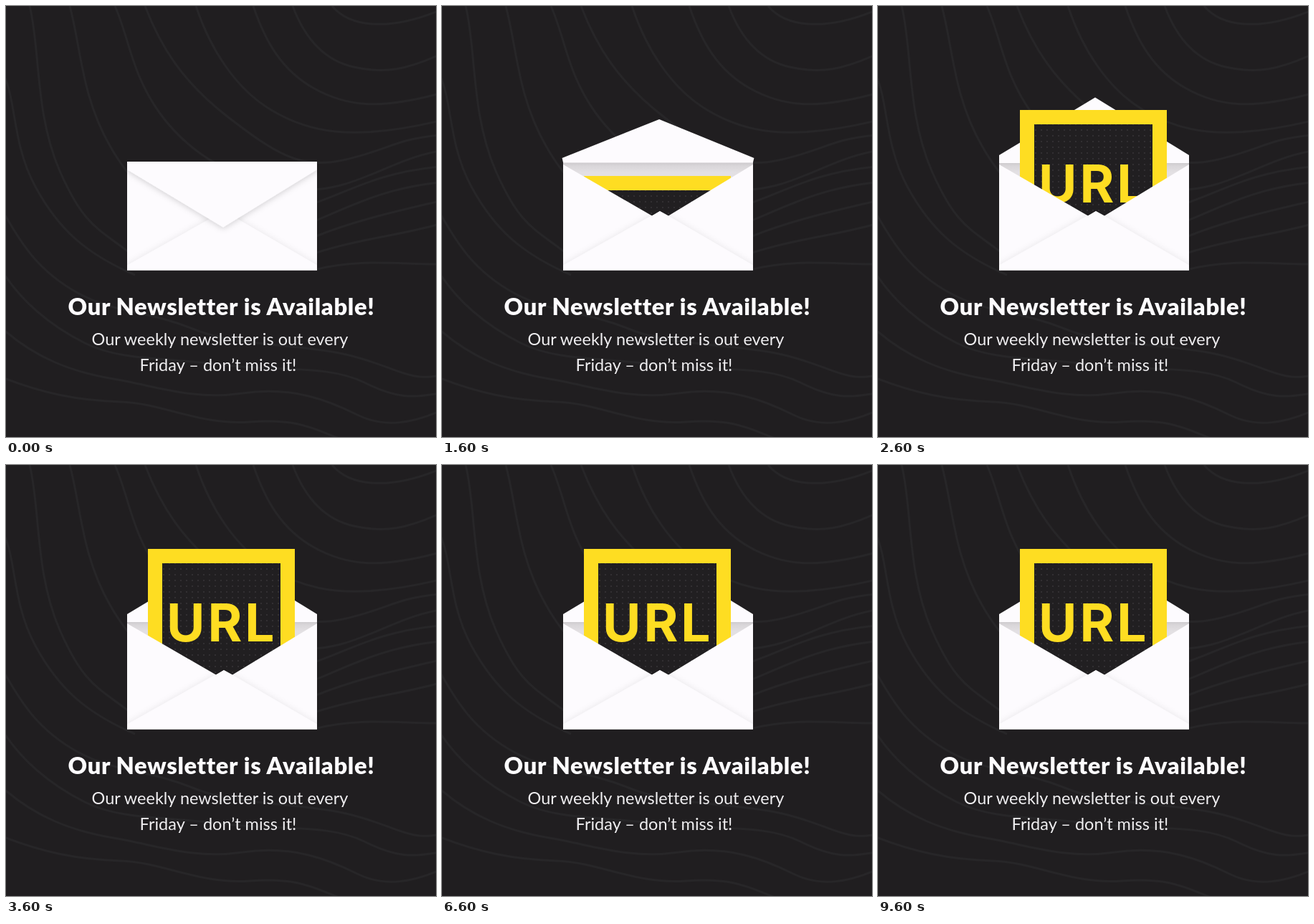
Write an HTML page that moves like this. It is 600 px wide and 601 px high and loops after 9.7 s.

```html
<!DOCTYPE html>
<html lang="en">
<head>
<meta charset="utf-8">
<title>Newsletter</title>
<style>
html, body { margin: 0; width: 100%; height: 100%; overflow: hidden; background: #201e20; }
svg { display: block; width: 600px; height: 601px; }
.lines { fill: none; stroke: #272628; stroke-width: 3; }
.paper { fill: #fdfbfe; }
.copy { font-family: Lato, "Open Sans", sans-serif; text-anchor: middle; fill: #efeef0; font-weight: 400; font-size: 24px; font-variant-ligatures: none; }
.title { font-weight: 900; font-size: 31px; letter-spacing: .02em; fill: #fdfcfe; }
.word { font: 700 73px Inter, "Open Sans", sans-serif; letter-spacing: 4px; fill: #fedd22; }
</style>
</head>
<body>
<svg viewBox="0 0 600 601">
  <defs>
    <linearGradient id="lining" x1="0" y1="0" x2="0" y2="1">
      <stop offset="0" stop-color="#c9c6c9"/>
      <stop offset=".04" stop-color="#d9d6d9"/>
      <stop offset=".1" stop-color="#e3e0e3"/>
      <stop offset="1" stop-color="#e8e5e8"/>
    </linearGradient>
    <pattern id="dots" width="8" height="8" patternUnits="userSpaceOnUse">
      <circle cx="4" cy="4" r=".9" fill="#39373a"/>
    </pattern>
    <filter id="soft" x="-20%" y="-20%" width="140%" height="140%">
      <feDropShadow dx="0" dy="2" stdDeviation="4" flood-color="#000" flood-opacity=".17"/>
    </filter>
    <filter id="faint" x="-20%" y="-20%" width="140%" height="140%">
      <feDropShadow dx="0" dy="-1" stdDeviation="4" flood-color="#000" flood-opacity=".08"/>
    </filter>
    <clipPath id="inside"><rect x="169" y="0" width="265" height="345"/></clipPath>
    <clipPath id="front"><path d="M169 221L293 292.5L304 286L316 292.5L434 221V368.4H169Z"/></clipPath>
    <clipPath id="body"><rect x="166" y="217" width="272" height="151.4"/></clipPath>
  </defs>

  <g class="lines">
    <path d="M-5 92C15 130 8 190 40 250S110 345 180 375"/>
    <path d="M33 0C48 60 40 150 75 230S130 310 180 350"/>
    <path d="M89 0C105 60 105 125 145 195S210 265 260 290"/>
    <path d="M152 0C172 45 175 95 215 150S320 245 400 255S530 215 605 202"/>
    <path d="M194 0C215 55 245 105 310 155S410 228 470 215S545 185 605 180"/>
    <path d="M265 0C285 60 320 115 370 145S480 190 605 160"/>
    <path d="M345 0C362 50 385 90 430 115S520 145 605 122"/>
    <path d="M400 0C415 40 440 75 485 85S560 88 605 68"/>
    <path d="M455 0C480 30 535 35 605 6"/>
    <path d="M430 275C480 258 520 232 605 224"/>
    <path d="M430 300C490 275 530 254 605 246"/>
    <path d="M430 322C490 298 550 285 605 272"/>
    <path d="M430 345C490 325 550 320 605 304"/>
    <path d="M430 368C490 352 545 360 605 360"/>
    <path d="M-5 285C20 330 45 370 100 400S200 425 260 450S400 470 470 485S560 525 605 515"/>
    <path d="M-5 370C20 410 60 445 110 470S220 490 300 500S450 500 500 525S570 545 605 540"/>
    <path d="M-5 450C40 490 90 510 150 520S260 550 330 540S450 550 490 570S570 580 605 565"/>
    <path d="M-5 518C50 540 100 550 160 552S270 585 340 580S430 590 470 605"/>
  </g>

  <rect x="169" y="217" width="265" height="151" fill="url(#lining)"/>
  <g id="back"></g>
  <g clip-path="url(#inside)">
    <g id="card">
      <rect x="198" width="205" height="250" fill="#fedd22"/>
      <rect x="218" y="20" width="165" height="230" fill="#211f21"/>
      <rect x="218" y="20" width="165" height="230" fill="url(#dots)"/>
      <text id="word" class="word" x="224" y="129">URL</text>
    </g>
  </g>
  <g clip-path="url(#front)">
    <rect class="paper" x="169" y="217" width="265" height="152"/>
    <path class="paper" filter="url(#faint)" d="M165 364L304 286L438 364V380H165Z"/>
  </g>
  <g id="over"></g>
  <polygon id="flap" class="paper"/>

  <text class="copy title" x="300.5" y="431" data-w="428">Our Newsletter is Available!</text>
  <text class="copy" x="298.5" y="473" data-w="358">Our weekly newsletter is out every</text>
  <text class="copy" x="296" y="509" data-w="219">Friday – don’t miss it!</text>
</svg>
<script>
const $ = id => document.getElementById(id);
const [flap, back, over, card, word] = ['flap', 'back', 'over', 'card', 'word'].map($);
const LOOP = 9700, STEP = 100, HINGE = 218, DEPTH = 750;
// x and distance from the hinge
const FLAP = [[169, -1], [169, 10], [303, 90.5], [434, 10], [434, -1]];
const clamp = v => Math.min(1, Math.max(0, v));

// Choose a type size that suits each line
for (const el of document.querySelectorAll('[data-w]')) {
  const size = parseFloat(getComputedStyle(el).fontSize);
  el.style.fontSize = size * el.dataset.w / el.getComputedTextLength() + 'px';
}

function flapAngle(t) {
  const p = clamp((t - 500) / 1735);
  return Math.PI * (1 - Math.cos(Math.PI * p)) / 2;
}

function cardTop(t) {
  if (t < 1600) return 250 - 13 * clamp((t - 1300) / 300) ** 2;
  if (t < 2600) return 237 - 92 * (t - 1600) / 1000;
  return 117 + 28 * (1 - clamp((t - 2600) / 1000)) ** 3;
}

function shake(t) {
  const u = (t - 4000) % 1000;
  return t < 4000 || u >= 600 ? 0 : 15 * Math.sin(4 * Math.PI * (u + STEP) / 700);
}

function draw(t) {
  const a = flapAngle(t), open = a > Math.PI / 2;
  flap.setAttribute('points', FLAP.map(([x, d]) => {
    const s = DEPTH / (DEPTH - d * Math.sin(a));
    return [302 + (x - 302) * s, HINGE + d * Math.cos(a) * s].map(v => v.toFixed(2));
  }).join(' '));
  const layer = open ? back : over;
  if (flap.parentNode !== layer) layer.append(flap);
  over.setAttribute('clip-path', 'url(#body)');
  if (open) flap.removeAttribute('filter');
  else flap.setAttribute('filter', 'url(#soft)');
  card.setAttribute('transform', `translate(0 ${cardTop(t).toFixed(2)})`);
  word.setAttribute('transform', `translate(${shake(t).toFixed(2)} 0)`);
}

const start = performance.now();
function tick() {
  const t = (performance.now() - start) % LOOP;
  draw(Math.floor(t / STEP) * STEP);
  requestAnimationFrame(tick);
}
tick();
</script>
</body>
</html>
```
